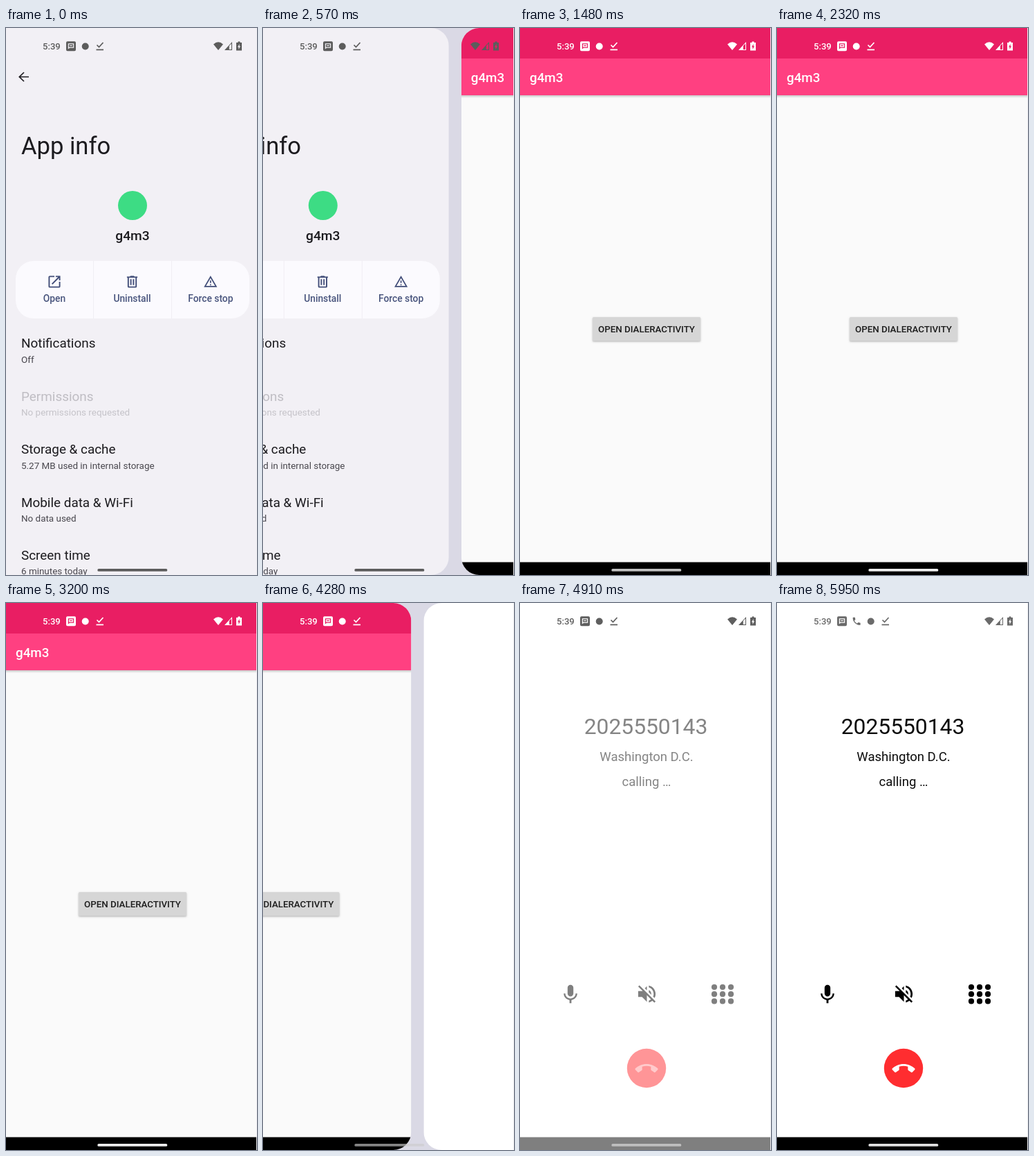
These frames come from a looping animation (363 by 789 pixels, 8 s). An HTML page with a canvas:

```html
<!DOCTYPE html>
<html lang="en">
<head>
<meta charset="utf-8">
<title>App launch</title>
<style>
html, body { margin: 0; width: 100%; height: 100%; overflow: hidden; background: #dad9e5; }
canvas { display: block; width: 363px; height: 789px; }
</style>
</head>
<body>
<canvas id="stage"></canvas>
<script>
const W = 363, H = 789, LOOP = 8000, STEP = 70;
const CARD = 365, TRAVEL = 383, RADIUS = 26;
const APP_NAME = 'g4m3';
const canvas = document.getElementById('stage');
const ctx = canvas.getContext('2d');
const dpr = window.devicePixelRatio || 1;
canvas.width = W * dpr;
canvas.height = H * dpr;

const ICONS = {
  open: 'M19 19H5V5h7V3H5a2 2 0 0 0-2 2v14a2 2 0 0 0 2 2h14a2 2 0 0 0 2-2v-7h-2v7zM14 3v2h3.59l-9.83 9.83 1.41 1.41L19 6.41V10h2V3h-7z',
  bin: 'M5 6v13a2 2 0 0 0 2 2h10a2 2 0 0 0 2-2V6zM7 6h10v13H7zM15.5 4l-1-1h-5l-1 1H4v2h16V4zM9 8h2v9H9zM13 8h2v9h-2z',
  warning: 'M12 2 1 21h22zM12 5.99 19.53 19H4.47zM11 16h2v2h-2zM11 10h2v4h-2z',
  mic: 'M12 14a3 3 0 0 0 3-3V5a3 3 0 0 0-6 0v6a3 3 0 0 0 3 3zM17.3 11c0 3-2.54 5.1-5.3 5.1S6.7 14 6.7 11H5c0 3.41 2.72 6.23 6 6.72V21h2v-3.28c3.28-.48 6-3.3 6-6.72h-1.7z',
  muted: 'M16.5 12A4.5 4.5 0 0 0 14 7.97v2.21l2.45 2.45c.03-.2.05-.41.05-.63zm2.5 0c0 .94-.2 1.82-.54 2.64l1.51 1.51A8.8 8.8 0 0 0 21 12c0-4.28-2.99-7.86-7-8.77v2.06c2.89.86 5 3.54 5 6.71zM4.27 3 3 4.27 7.73 9H3v6h4l5 5v-6.73l4.25 4.25c-.67.52-1.42.93-2.25 1.18v2.06a8.99 8.99 0 0 0 3.69-1.81L19.73 21 21 19.73l-9-9L4.27 3zM12 4 9.91 6.09 12 8.18V4z',
  hangUp: 'M12 9c-1.6 0-3.15.25-4.6.72v3.1c0 .39-.23.74-.56.9-.98.49-1.87 1.12-2.66 1.85-.18.18-.43.28-.7.28-.28 0-.53-.11-.71-.29L.29 13.08a1 1 0 0 1 0-1.41C3.34 8.78 7.46 7 12 7s8.66 1.78 11.71 4.67a1 1 0 0 1 0 1.42l-2.48 2.48c-.18.18-.43.29-.71.29-.27 0-.52-.11-.7-.28a11.27 11.27 0 0 0-2.67-1.85 1 1 0 0 1-.56-.9v-3.1C15.15 9.25 13.6 9 12 9z',
  phone: 'M6.62 10.79c1.44 2.83 3.76 5.14 6.59 6.59l2.2-2.2c.27-.27.67-.36 1.02-.24 1.12.37 2.33.57 3.57.57.55 0 1 .45 1 1V20c0 .55-.45 1-1 1C10.61 21 3 13.39 3 4c0-.55.45-1 1-1h3.5c.55 0 1 .45 1 1 0 1.25.2 2.45.57 3.57.11.35.03.74-.25 1.02z',
  message: 'M2 0h10a2 2 0 0 1 2 2v10a2 2 0 0 1-2 2H2a2 2 0 0 1-2-2V2a2 2 0 0 1 2-2zM2.8 3v8.2L5 9.4h6.2V3zM4 4.1h6v4.2H4zM5 5.6h4v1.1H5z',
  wifi: 'M0 3.5Q7-3 14 3.5L7 12z',
  signal: 'M11 0v12H0zM10 2.5V11H6.8V5.7z',
  battery: 'M2.5 0h3v1.5H8V13H0V1.5h2.5zM4.6 3.5 2 8h1.5v3.2L6 6.7H4.6z'
};
for (const key in ICONS) ICONS[key] = new Path2D(ICONS[key]);

const clamp = v => Math.min(1, Math.max(0, v));
const mix = (a, b, p) => a + (b - a) * p;
const gray = v => `rgb(${v},${v},${v})`;
const stepped = (t, start) => start + Math.floor((t - start) / STEP) * STEP;

function cubic(a, b, c, d, s) {
  const r = 1 - s;
  return r * r * r * a + 3 * r * r * s * b + 3 * r * s * s * c + s * s * s * d;
}

// Two-segment "emphasized" easing: quick start, very long settle.
function emphasized(x) {
  if (x <= 0) return 0;
  if (x >= 1) return 1;
  const [xs, ys] = x < 1 / 6
    ? [[0, 0.05, 0.1333, 1 / 6], [0, 0, 0.06, 0.4]]
    : [[1 / 6, 0.2083, 0.25, 1], [0.4, 0.82, 1, 1]];
  let lo = 0, hi = 1;
  for (let i = 0; i < 24; i++) {
    const mid = (lo + hi) / 2;
    if (cubic(...xs, mid) < x) lo = mid; else hi = mid;
  }
  return cubic(...ys, lo);
}

function keyed(points, t) {
  let [t0, v0] = points[0];
  for (const [t1, v1] of points) {
    if (t < t1) return t1 === t0 ? v1 : mix(v0, v1, clamp((t - t0) / (t1 - t0)));
    [t0, v0] = [t1, v1];
  }
  return v0;
}

function text(str, x, y, size, color, { weight = 400, align = 'left' } = {}) {
  ctx.font = `${weight} ${size}px Roboto, sans-serif`;
  ctx.textAlign = align;
  ctx.fillStyle = color;
  ctx.fillText(str, x, y);
}

function rect(x, y, w, h, color, r = 0) {
  ctx.fillStyle = color;
  ctx.beginPath();
  ctx.roundRect(x, y, w, h, r);
  ctx.fill();
}

function dot(x, y, r, color) {
  ctx.fillStyle = color;
  ctx.beginPath();
  ctx.arc(x, y, r, 0, Math.PI * 2);
  ctx.fill();
}

function icon(name, x, y, scale, color, rule = 'evenodd') {
  ctx.save();
  ctx.translate(x, y);
  ctx.scale(scale, scale);
  ctx.fillStyle = color;
  ctx.fill(ICONS[name], rule);
  ctx.restore();
}

function infoScreen() {
  rect(0, 0, CARD, H, '#f2f0f5');
  ctx.strokeStyle = '#1d1b20';
  ctx.lineWidth = 1.7;
  ctx.stroke(new Path2D('M33 70.5H19.5M26 64l-6.7 6.5 6.7 6.5'));
  text('App info', 22, 182, 34.6, '#1c1b1f');
  dot(183, 256, 21, '#3ddc84');
  text(APP_NAME, 183, 306, 19.2, '#1c1b1f', { weight: 500, align: 'center' });

  rect(14, 336, 338, 83, '#fbfafe', 26);
  const actions = [['Open', 'open', 70], ['Uninstall', 'bin', 182.5], ['Force stop', 'warning', 295.8]];
  for (const [label, name, x] of actions) {
    const scale = name === 'warning' ? 0.87 : 0.95;
    icon(name, x - 12 * scale, 366 - 12 * scale, scale, '#414d78');
    text(label, x, 395, 13.8, '#48547d', { weight: 500, align: 'center' });
  }
  rect(126, 336, 1, 83, '#f0eef4');
  rect(239, 336, 1, 83, '#f0eef4');

  const rows = [
    ['Notifications', 'Off'],
    ['Permissions', 'No permissions requested'],
    ['Storage & cache', '5.27 MB used in internal storage'],
    ['Mobile data & Wi-Fi', 'No data used'],
    ['Screen time', '6 minutes today']
  ];
  rows.forEach(([title, note], i) => {
    const y = 461.3 + i * 76.4, off = i === 1;
    text(title, 22, y, 18.9, off ? '#bfbdc3' : '#1c1b1f');
    text(note, 22, y + 21.5, 13.45, off ? '#c5c3c9' : '#49474e');
  });
}

function navBar() {
  rect(0, 770.5, CARD, 19, '#000');
}

function appScreen(press) {
  rect(0, 0, CARD, H, '#fafafa');
  const shade = ctx.createLinearGradient(0, 97, 0, 101);
  shade.addColorStop(0, 'rgba(0,0,0,.2)');
  shade.addColorStop(1, 'rgba(0,0,0,0)');
  rect(0, 97, CARD, 4, shade);
  rect(0, 0, CARD, 44, '#e91e63');
  rect(0, 44, CARD, 53, '#ff4081');
  text(APP_NAME, 14, 78, 18.8, '#fff', { weight: 500 });

  ctx.save();
  ctx.shadowColor = 'rgba(0,0,0,.28)';
  ctx.shadowBlur = (2.5 + press * 3) * dpr;
  ctx.shadowOffsetY = (1 + press) * dpr;
  rect(105, 417, 156, 34.5, gray(214 - 14 * press), 1.5);
  ctx.restore();
  text('OPEN DIALERACTIVITY', 183, 439, 13.3, '#1d1d1d', { weight: 500, align: 'center' });
  navBar();
}

function callScreen(reveal) {
  rect(0, 0, CARD, H, '#fff');
  if (!reveal) return;
  ctx.save();
  ctx.globalAlpha = reveal;
  const center = { align: 'center' };
  text('2025550143', 182, 189, 31.8, '#0c0c0c', center);
  text('Washington D.C.', 183, 228, 18.5, '#0c0c0c', center);
  text('calling …', 183, 264, 18.5, '#0c0c0c', center);
  icon('mic', 73 - 12 * 1.4, 564 - 11.5 * 1.4, 1.4, '#000', 'nonzero');
  icon('muted', 183.5 - 12 * 1.4, 564 - 12 * 1.4, 1.4, '#000', 'nonzero');
  for (let i = 0; i < 9; i++) {
    dot(281 + i % 3 * 12, 554 + Math.floor(i / 3) * 10.2, 4.1, '#000');
  }
  dot(183, 671, 28.2, '#ff2d30');
  icon('hangUp', 183 - 12 * 1.38, 671 - 11.4 * 1.38, 1.38, '#fff', 'nonzero');
  navBar();
  ctx.restore();
}

function card(x, screen) {
  if (x >= W || x <= -CARD) return;
  ctx.save();
  ctx.translate(x, 0);
  ctx.beginPath();
  ctx.roundRect(0, 0, CARD, H, Math.abs(x) < 0.3 ? 0 : RADIUS);
  ctx.clip();
  screen();
  ctx.restore();
}

function statusBar(color, calling) {
  text('5:39', 53, 31, 13.1, color, { weight: 500 });
  icon('message', 87, 19.3, 1, color);
  const shift = 21 * calling;
  if (calling) {
    ctx.globalAlpha = calling;
    icon('phone', 107.8, 19, 0.61, color);
    ctx.globalAlpha = 1;
  }
  dot(114.7 + shift, 26.5, 5, color);
  ctx.save();
  ctx.translate(shift, 0);
  ctx.strokeStyle = color;
  ctx.lineWidth = 1.7;
  ctx.stroke(new Path2D('M131.5 24.5l3 3 6-6.5M130.5 31.3h10.5'));
  ctx.restore();
  icon('wifi', 300, 20, 1, color);
  icon('signal', 316, 20, 1, color);
  icon('battery', 333, 19.5, 1, color);
}

const HANDLE_GRAY = [[500, 92], [570, 92], [640, 60], [1200, 60], [1480, 192], [1900, 228], [2320, 238]];

function handle(t, offset, reveal) {
  let color = gray(keyed(HANDLE_GRAY, t));
  if (t >= 4280) {
    const tone = keyed([[5050, 205], [5390, 218], [5600, 224]], t);
    color = `rgba(${tone},${tone},${tone},${mix(0.65, 1, reveal)})`;
  }
  rect(132.3 + offset, 780, 101, 3.8, color, 1.9);
}

function draw(now) {
  const time = now % LOOP;
  const t = time < 500 ? 0 : time < 2390 ? stepped(time, 500)
    : time < 3730 ? 2390 : time < 4280 ? stepped(time, 3730) : stepped(time, 4280);
  const launch = emphasized((t - 497) / 500);
  const dial = t < 4280 ? 0 : emphasized((t - 4197) / 500);
  const press = t < 3730 || t > 4000 ? 0 : Math.sin(Math.PI * (t - 3660) / 410);
  const reveal = clamp((t - 4770) / 280);
  const calling = clamp((stepped(time, 5740) - 5670) / 280);

  ctx.setTransform(dpr, 0, 0, dpr, 0, 0);
  rect(0, 0, W, H, '#dad9e5');
  const appX = TRAVEL * (1 - launch - dial);
  card(appX - TRAVEL, infoScreen);
  card(appX, () => appScreen(press));
  card(appX + TRAVEL, () => callScreen(reveal));

  const onPink = launch > 0.5 && dial < 0.5;
  const dark = gray(keyed([[4280, 92], [5120, 96], [5390, 106]], t));
  statusBar(onPink ? '#fff' : dark, calling);

  const rest = dial ? 1 - dial : launch ? 1 - launch : 0;
  handle(t, rest < 0.12 ? rest * TRAVEL : 0, reveal);
  rect(362, 0, 1, H, '#eeedf1');
}

function tick() {
  draw(performance.now() - begin);
  requestAnimationFrame(tick);
}
const begin = performance.now();
tick();
</script>
</body>
</html>
```
